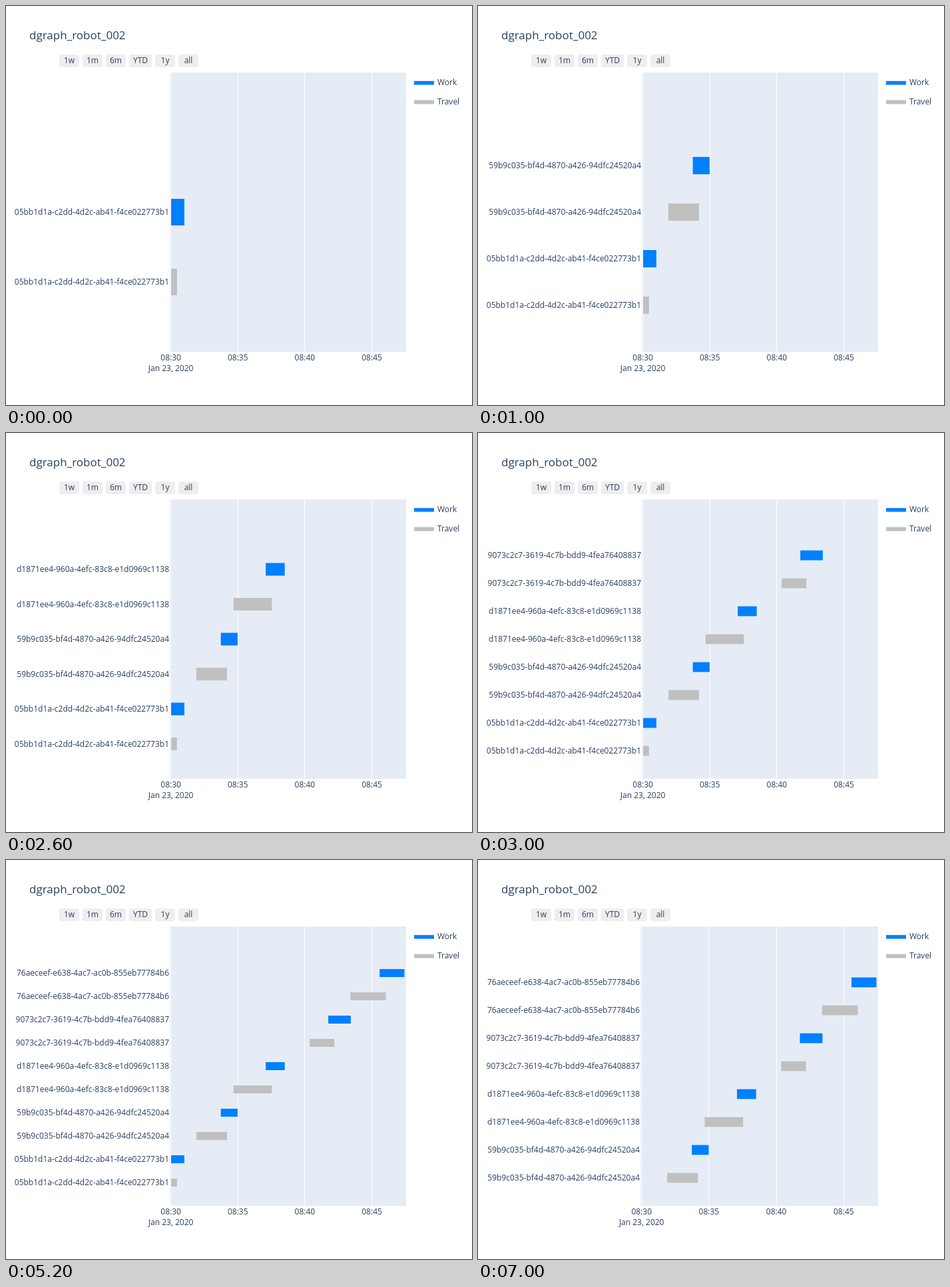
Recreate the animation shown at these times as an HTML page. Size 700x600 px, loop 8 s.

```html
<!DOCTYPE html>
<html lang="en">
<head>
<meta charset="utf-8">
<title>dgraph_robot_002</title>
<style>
  html, body { margin: 0; width: 100%; height: 100%; overflow: hidden; background: #fff; }
  svg { display: block; width: 700px; height: 600px; }
  text { font: 12px "Open Sans", sans-serif; fill: #2a3f5f; white-space: pre; }
  .title { font-size: 17px; }
  .mid { text-anchor: middle; }
  .end { text-anchor: end; }
  .grid { fill: #fff; shape-rendering: crispEdges; }
</style>
</head>
<body>
<svg id="chart" viewBox="0 0 700 600"></svg>
<script>
const LOOP = 8000;
const TOP = 100, BOTTOM = 520, RIGHT = 601;
const WORK = '#0080ff', TRAVEL = '#c0c0c0';

// Job id, then travel and work spans in minutes after 08:30
const jobs = [
  ['05bb1d1a-c2dd-4d2c-ab41-f4ce022773b1', 0.02, 0.46, 0.02, 1.01],
  ['59b9c035-bf4d-4870-a426-94dfc24520a4', 1.9, 4.19, 3.73, 4.985],
  ['d1871ee4-960a-4efc-83c8-e1d0969c1138', 4.68, 7.54, 7.08, 8.5],
  ['9073c2c7-3619-4c7b-bdd9-4fea76408837', 10.36, 12.2, 11.75, 13.43],
  ['76aeceef-e638-4ac7-ac0b-855eb77784b6', 13.4, 16.05, 15.58, 17.43],
];
const bars = jobs.flatMap(([id, t0, t1, w0, w1]) => [
  { id, from: t0, to: t1, color: TRAVEL },
  { id, from: w0, to: w1, color: WORK },
]);

// Start time, first and last visible bar
const steps = [
  [0, 0, 2], [1000, 0, 4], [2000, 0, 6], [3000, 0, 8],
  [4000, 0, 10], [6000, 1, 10], [7000, 2, 10],
];

const wide = { left: 246, zero: 247.6, minute: 20.13 };
const wider = { left: 244, zero: 245.7, minute: 20.24 };

const svg = document.getElementById('chart');

function add(parent, tag, attrs, content) {
  const el = document.createElementNS('http://www.w3.org/2000/svg', tag);
  for (const key in attrs) el.setAttribute(key, attrs[key]);
  if (content) el.textContent = content;
  parent.appendChild(el);
  return el;
}

const rect = (parent, x, y, width, height, fill, more) =>
  add(parent, 'rect', { x, y, width, height, fill, ...more });
const label = (parent, x, y, content, cls = '') =>
  add(parent, 'text', { x, y, class: cls }, content);

function drawFrame() {
  label(svg, 35, 50, 'dgraph_robot_002', 'title');

  const buttons = [['1w', 30], ['1m', 30], ['6m', 30], ['YTD', 34], ['1y', 30], ['all', 30]];
  let x = 80;
  for (const [name, width] of buttons) {
    rect(svg, x, 73, width, 19, '#eee', { rx: 3 });
    label(svg, x + width / 2, 86, name, 'mid');
    x += width + 5;
  }

  [['Work', WORK], ['Travel', TRAVEL]].forEach(([name, color], i) => {
    const y = 112 + i * 29;
    rect(svg, 613, y, 30, 1, '#dcdfe4');
    rect(svg, 613, y + 1, 30, 5.5, color);
    label(svg, 648, y + 7, name);
  });
}

function drawPlot(first, last) {
  const axis = first === 2 ? wider : wide;
  const xAt = minutes => axis.zero + minutes * axis.minute;
  plot.replaceChildren();
  rect(plot, axis.left, TOP, RIGHT - axis.left, BOTTOM - TOP, '#e5ecf6');

  for (let m = 0; m <= 15; m += 5) {
    rect(plot, xAt(m) - 0.5, TOP, 1, BOTTOM - TOP, '#fff', { class: 'grid' });
    label(plot, xAt(m), 533, '08:' + (30 + m), 'mid');
  }
  label(plot, xAt(0), 548.6, 'Jan 23, 2020', 'mid');

  const gap = (BOTTOM - TOP) / (last - first + 2);
  const height = gap * 0.4 - 2;
  bars.slice(first, last).forEach((bar, i) => {
    const y = BOTTOM - gap * (i + 1);
    const x = xAt(bar.from);
    rect(plot, x, y - height / 2, xAt(bar.to) - x, height, bar.color);
    label(plot, axis.left - 1, y + 4.2, bar.id, 'end');
  });
}

const plot = add(svg, 'g', {});
drawFrame();

let shown = null;
const start = performance.now();

function tick(now) {
  const t = Math.max(0, now - start) % LOOP;
  const step = steps.filter(s => s[0] <= t).pop();
  if (step !== shown) {
    shown = step;
    drawPlot(step[1], step[2]);
  }
  requestAnimationFrame(tick);
}
tick(start);
</script>
</body>
</html>
```
